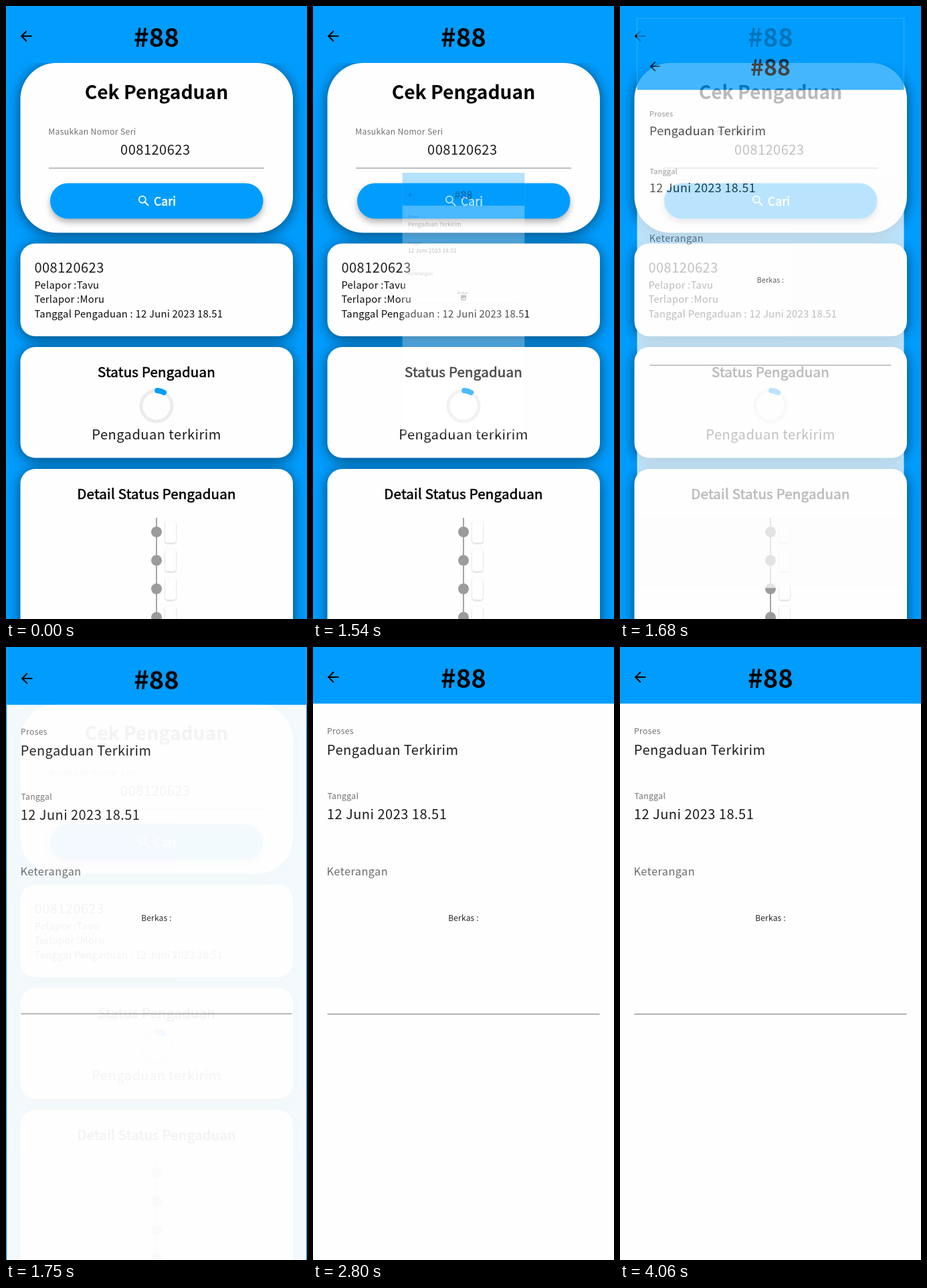
An HTML page that plays this animation: 450 by 915 pixels, repeating every 4130 ms.

```html
<!DOCTYPE html>
<html lang="id">
<head>
<meta charset="utf-8">
<title>Cek Pengaduan</title>
<style>
  html, body { margin: 0; width: 100%; height: 100%; overflow: hidden; background: #009dfe; }
  svg { display: block; width: 450px; height: 915px; font-family: "Noto Sans CJK JP", "Noto Sans CJK SC", "Noto Sans", sans-serif; }
  text { white-space: pre; }
  .mid { text-anchor: middle; }
  .blue { fill: #009dfe; }
  .title { font-size: 38.3px; font-weight: 700; }
  .heading { font-size: 28.2px; font-weight: 700; }
  .section { font-size: 20.5px; letter-spacing: .2px; stroke: #000; stroke-width: .6px; }
  .value { font-size: 20.1px; letter-spacing: .45px; fill: #1c1c1c; }
  .info { font-size: 14.8px; letter-spacing: .25px; fill: #0c0c0c; }
  .label { font-size: 12.2px; letter-spacing: .34px; fill: #707070; }
  .hint { font-size: 16.3px; letter-spacing: .45px; fill: #6c6c6c; }
  .small { font-size: 12px; letter-spacing: .2px; fill: #222; }
  .button { font-size: 17.6px; letter-spacing: .1px; fill: #fff; stroke: #fff; stroke-width: .6px; }
  .cards { fill: #fefefe; filter: drop-shadow(0 3px 10px rgba(0, 0, 0, .55)); }
  .raised { filter: drop-shadow(0 5px 5px rgba(0, 0, 0, .3)); }
  .chip { fill: #fefefe; filter: drop-shadow(0 1px 1px rgba(0, 0, 0, .22)); }
</style>
</head>
<body>
<svg viewBox="0 0 450 915">
  <defs>
    <clipPath id="body"><rect y="85" width="450" height="830"/></clipPath>
    <g id="bar">
      <path d="M20 11H7.8l5.6-5.6L12 4l-8 8 8 8 1.4-1.4L7.8 13H20z" transform="translate(17.5 32.4) scale(1.05)"/>
      <text class="title mid" x="225" y="61">#88</text>
    </g>
    <g id="step">
      <circle cx="225" cy="785" r="8" fill="#9b9b9b"/>
      <rect class="chip" x="238" y="768" width="16" height="33.5" rx="4"/>
    </g>
  </defs>

  <rect class="blue" width="450" height="915"/>
  <use href="#bar"/>
  <g clip-path="url(#body)">
    <g class="cards">
      <rect x="21.5" y="85" width="407.5" height="253.5" rx="54"/>
      <rect x="21.5" y="354.5" width="407.5" height="138.5" rx="22"/>
      <rect x="21.5" y="509" width="407.5" height="165.5" rx="22"/>
      <rect x="21.5" y="691" width="407.5" height="300" rx="22"/>
    </g>
  </g>

  <text class="heading mid" x="225" y="138.5">Cek Pengaduan</text>
  <text class="label" x="63.3" y="192">Masukkan Nomor Seri</text>
  <text class="value mid" x="223.3" y="222">008120623</text>
  <path d="M64 242H386" stroke="#a8a8a8" stroke-width="1.6"/>
  <rect class="blue raised" x="66" y="264.5" width="318.5" height="53" rx="26.5"/>
  <g fill="none" stroke="#fff" stroke-width="2" transform="translate(195.2 280.2) scale(.91)">
    <circle cx="9.5" cy="9.5" r="5.5"/>
    <path d="M13.8 13.8L19.7 19.7"/>
  </g>
  <text class="button" x="221" y="298">Cari</text>

  <text class="value" x="42.4" y="398">008120623</text>
  <text class="info" x="42.4" y="422">Pelapor :Tavu</text>
  <text class="info" x="42.4" y="443">Terlapor :Moru</text>
  <text class="info" x="42.4" y="464.5">Tanggal Pengaduan : 12 Juni 2023 18.51</text>

  <text class="section mid" x="225" y="553.5">Status Pengaduan</text>
  <circle cx="225" cy="597" r="23" fill="none" stroke="#ececec" stroke-width="5"/>
  <path d="M226.2 574A23 23 0 0 1 236.1 576.9" fill="none" stroke="#009dfe" stroke-width="8" stroke-linecap="round"/>
  <text class="value mid" x="225" y="647">Pengaduan terkirim</text>

  <text class="section mid" x="225" y="736">Detail Status Pengaduan</text>
  <path d="M225 764V915" stroke="#9b9b9b" stroke-width="1.8"/>
  <use href="#step"/>
  <use href="#step" y="42.5"/>
  <use href="#step" y="85"/>
  <use href="#step" y="127.5"/>

  <g id="detail">
    <rect x="0" y="-36" width="450" height="959" fill="#fefefe"/>
    <rect class="blue" x="0" y="-36" width="450" height="120.5"/>
    <use href="#bar"/>
    <text class="label" x="21" y="129.5">Proses</text>
    <text class="value" x="20.8" y="160.7">Pengaduan Terkirim</text>
    <text class="label" x="21.4" y="226.5">Tanggal</text>
    <text class="value" x="20.8" y="257">12 Juni 2023 18.51</text>
    <text class="hint" x="20.5" y="340.6">Keterangan</text>
    <text class="small mid" x="225" y="409">Berkas :</text>
    <g id="loading">
      <rect x="215.5" y="413.5" width="19" height="19" rx="2" fill="#333"/>
      <path d="M218 429L222 423.5L225 427L229 421.5L233 429Z" fill="#fefefe"/>
      <path d="M21.5 444.5H428.5" stroke="#ddd"/>
    </g>
    <path id="loaded" d="M21.5 548H428.5" stroke="#9c9a9c" stroke-width="1.7"/>
  </g>
</svg>
<script>
  const LOOP = 4130, STEP = 70, OPEN_AT = 1448, OPEN_TIME = 316, LOADED_AT = 1680;
  const [detail, loading, loaded] = ["detail", "loading", "loaded"].map(id => document.getElementById(id));
  const show = (el, on) => el.setAttribute("visibility", on ? "visible" : "hidden");

  function draw(now) {
    const t = Math.floor(now % LOOP / STEP) * STEP;
    const p = Math.min(1, Math.max(0, (t - OPEN_AT) / OPEN_TIME));
    const scale = 1 - (1 - p ** 1.1) ** 1.75;
    detail.setAttribute("opacity", p);
    detail.setAttribute("transform", `translate(225 443.7) scale(${scale}) translate(-225 -443.7)`);
    show(loading, p > 0 && t < LOADED_AT);
    show(loaded, t >= LOADED_AT);
    requestAnimationFrame(draw);
  }
  draw(0);
</script>
</body>
</html>
```
